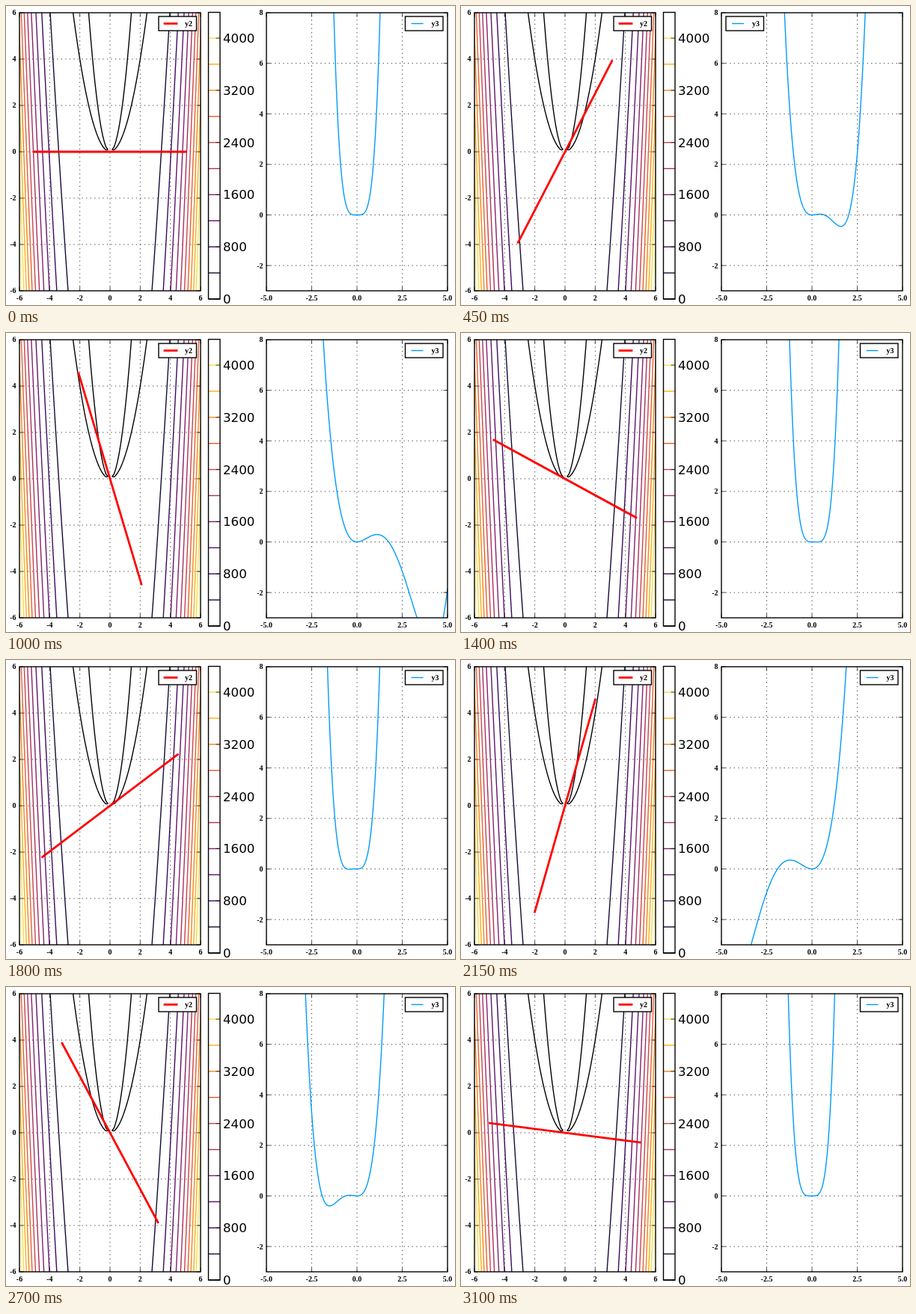
Animation of 600x400 px, one loop 3.15 s. Source, as an HTML page:

```html
<!DOCTYPE html>
<html lang="en">
<head>
<meta charset="utf-8">
<title>Contours and a rotating slice</title>
<style>
  html, body { margin: 0; width: 100%; height: 100%; overflow: hidden; background: #fff; }
  svg { display: block; width: 600px; height: 400px; }
  path, rect { fill: none; stroke: #000; stroke-width: 1.39; }
  .grid { stroke-width: .7; stroke-dasharray: 1.39 4.17; }
  .tick { stroke-width: .7; }
  .legend rect { fill: #fff; }
  .red { stroke: #f00; stroke-width: 2.78; stroke-linecap: square; }
  .blue { stroke: #009afa; }
  .small { font: bold 10px "Liberation Serif", serif; }
  .bar { font: 16.67px "DejaVu Sans", sans-serif; }
</style>
</head>
<body>
<svg id="stage" viewBox="0 0 600 400">
  <defs>
    <clipPath id="clipL"><rect x="18" y="9" width="242" height="372"/></clipPath>
    <clipPath id="clipR"><rect x="348" y="9" width="242" height="372"/></clipPath>
  </defs>
</svg>
<script>
const STEP_MS = 50, STEPS = 63, TOP = 9, BOTTOM = 381;
const stage = document.getElementById('stage');

function add(parent, tag, attrs, text) {
  const el = document.createElementNS('http://www.w3.org/2000/svg', tag);
  for (const key in attrs) el.setAttribute(key, attrs[key]);
  if (text !== undefined) el.textContent = text;
  parent.appendChild(el);
  return el;
}

const polyline = pts => 'M' + pts.map(p => p.map(v => v.toFixed(2)).join(' ')).join('L');

// Maps data ranges to a plot box 242 px wide.
function makeAxes(left, x0, x1, y0, y1) {
  return {
    left, right: left + 242,
    x: v => left + (v - x0) / (x1 - x0) * 242,
    y: v => BOTTOM - (v - y0) / (y1 - y0) * (BOTTOM - TOP)
  };
}

function drawGrid(ax, xs, ys) {
  let d = '';
  for (const v of xs) d += `M${ax.x(v)} ${BOTTOM}V${TOP}`;
  for (const v of ys) d += `M${ax.left} ${ax.y(v)}H${ax.right}`;
  add(stage, 'path', { d, class: 'grid' });
}

function drawFrame(ax, xs, ys, digits) {
  let d = '';
  for (const v of xs) {
    const x = ax.x(v);
    d += `M${x} ${BOTTOM}v-5.5M${x} ${TOP}v5.5`;
    add(stage, 'text', { x, y: 394, class: 'small', 'text-anchor': 'middle' }, v.toFixed(digits));
  }
  for (const v of ys) {
    const y = ax.y(v);
    d += `M${ax.left} ${y}h5.5M${ax.right} ${y}h-5.5`;
    add(stage, 'text', { x: ax.left - 4.5, y: y + 3.4, class: 'small', 'text-anchor': 'end' }, v);
  }
  add(stage, 'path', { d, class: 'tick' });
  add(stage, 'rect', { x: ax.left, y: TOP, width: 242, height: BOTTOM - TOP });
}

function makeLegend(x, y, label, cls) {
  const g = add(stage, 'g', { class: 'legend', transform: `translate(${x} ${y})` });
  add(g, 'rect', { x: 0, y: 0, width: 50.5, height: 19 });
  add(g, 'path', { d: 'M8 9.5H24', class: cls });
  add(g, 'text', { x: 35, y: 12.7, class: 'small' }, label);
  return g;
}

// Colour map given by eleven evenly spaced stops.
const stops = [[0, 0, 4], [22, 11, 57], [66, 10, 104], [106, 23, 110], [147, 38, 103],
  [188, 55, 84], [221, 81, 58], [243, 120, 25], [252, 165, 10], [246, 215, 70], [252, 255, 164]];
function heat(t) {
  const i = Math.min(9, Math.floor(t * 10)), k = t * 10 - i;
  return `rgb(${stops[i].map((c, j) => Math.round(c + (stops[i + 1][j] - c) * k))})`;
}

const f = (x, y) => (y - x * x) * (y - 3 * x * x);

const left = makeAxes(18, -6, 6, -6, 6);
const right = makeAxes(348, -5, 5, -3, 8);
const evens = [-4, -2, 0, 2, 4], sixes = [-6, ...evens, 6];
const rightX = [-5, -2.5, 0, 2.5, 5], rightY = [-2, 0, 2, 4, 6, 8];

drawGrid(left, evens, evens);
drawGrid(right, [-2.5, 0, 2.5], [-2, 0, 2, 4, 6]);

const contours = add(stage, 'g', { 'clip-path': 'url(#clipL)' });
function contour(pts, stroke) {
  for (const side of [-1, 1]) {
    const d = polyline(pts.map(([x, y]) => [left.x(side * x), left.y(y)]));
    add(contours, 'path', { d, style: `stroke:${stroke}` });
  }
}

// Zero level: the two parabolas, joined by a blunt tip near the origin.
const inner = [], outer = [];
for (let y = 6; y > .12; y -= .1) {
  inner.push([Math.sqrt(y / 3), y]);
  outer.unshift([Math.sqrt(y), y]);
}
contour([...inner, [.15, .1], [.2, .08], [.3, .093], ...outer], heat(0));

for (let i = 1; i <= 11; i++) {
  const pts = [];
  for (let y = -6; y <= 6.001; y += .2) {
    pts.push([Math.sqrt((2 * y + Math.sqrt(y * y + 1200 * i)) / 3), y]);
  }
  contour(pts, heat(i / 11));
}

const chord = add(stage, 'path', { class: 'red' });
const slice = add(stage, 'path', { class: 'blue', 'clip-path': 'url(#clipR)' });

drawFrame(left, sixes, sixes, 0);
drawFrame(right, rightX, rightY, 1);

// Colour bar
for (let i = 0; i < 11; i++) {
  const y = 392 - i * 34.9;
  add(stage, 'path', { d: `M270.5 ${y}H286`, style: `stroke:${heat(i / 11)}` });
  if (i % 2 === 0) {
    add(stage, 'path', { d: `M286 ${y}h-5.5`, class: 'tick' });
    add(stage, 'text', { x: 290, y: y + 6, class: 'bar' }, i * 400);
  }
}
add(stage, 'rect', { x: 270.5, y: 8.5, width: 15.5, height: 383.5 });

makeLegend(204, 14, 'y2', 'red');
const key = makeLegend(533.5, 14, 'y3', 'blue');

// The key takes the first corner that the curve leaves free.
const corners = [[533.5, 14], [354, 14], [354, 357]];
const hits = (pts, [x, y]) =>
  pts.some(p => p[0] > x - .7 && p[0] < x + 51.2 && p[1] > y - .7 && p[1] < y + 19.7);

function draw(step) {
  const c = Math.cos(step / 10), s = Math.sin(step / 10);
  chord.setAttribute('d', polyline([-5, 5].map(r => [left.x(r * c), left.y(r * s)])));
  const pts = [];
  for (let i = -1000; i <= 1000; i++) {
    const r = i / 200;
    pts.push([right.x(r), right.y(f(r * c, r * s))]);
  }
  slice.setAttribute('d', polyline(pts.filter(p => p[1] > -200 && p[1] < 600)));
  const spot = corners.find(p => !hits(pts, p)) || corners[0];
  key.setAttribute('transform', `translate(${spot})`);
}

const start = performance.now();
let shown = -1;
function tick() {
  const step = Math.floor((performance.now() - start) / STEP_MS) % STEPS;
  if (step !== shown) draw(shown = step);
  requestAnimationFrame(tick);
}
tick();
</script>
</body>
</html>
```
